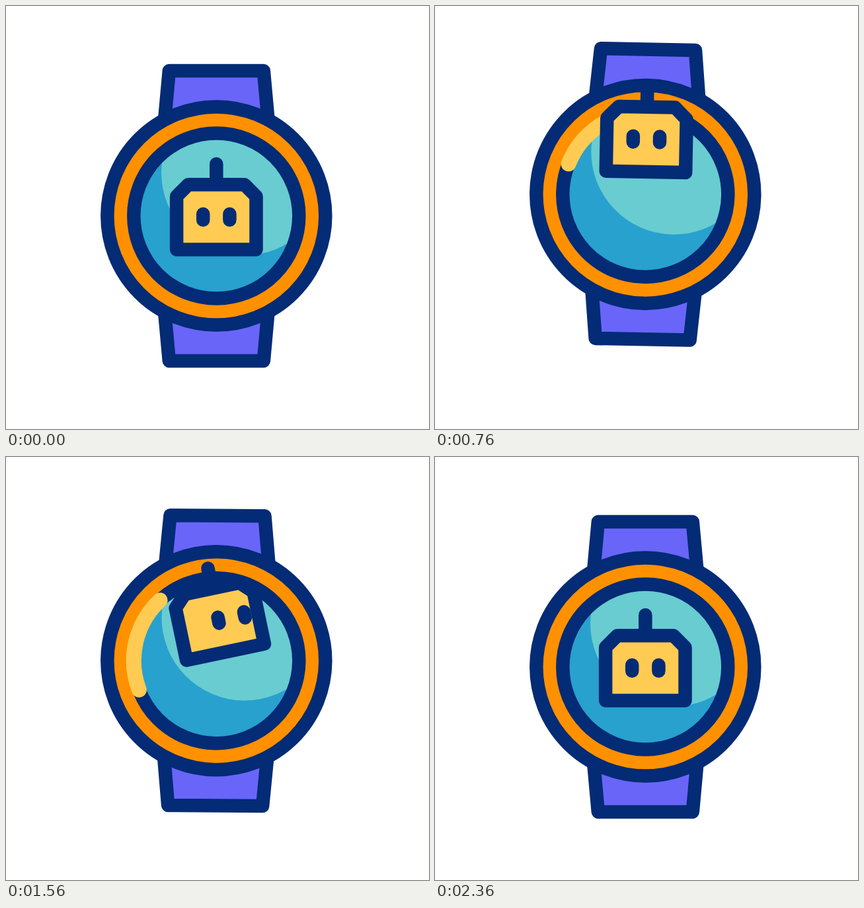
Recreate the animation shown at these times as an HTML page. Size 640 by 640 pixels, loop 2400 ms.

```html
<!DOCTYPE html>
<html lang="en">
<head>
<meta charset="utf-8">
<title>Smartwatch robot</title>
<style>
  html, body { margin: 0; width: 100%; height: 100%; overflow: hidden; background: #fff; }
  svg { display: block; width: 100%; height: 100%; }
  .line { stroke: #042b75; stroke-width: 20.5; stroke-linecap: round; stroke-linejoin: round; }
</style>
</head>
<body>
<svg viewBox="0 0 640 640">
  <defs>
    <clipPath id="glass"><circle r="116"/></clipPath>
  </defs>
  <g id="watch">
    <g class="line" fill="#6965f8">
      <path d="M-79-137L-71.5-219.4H71.5L79-137Z"/>
      <path d="M-79 137L-71.5 219.4H71.5L79 137Z"/>
    </g>
    <circle class="line" r="165" fill="#ff9100"/>
    <circle r="120" fill="#28a1ce"/>
    <g clip-path="url(#glass)"><circle cx="42.2" cy="-65.5" r="125.5" fill="#68ccd1"/></g>
    <circle class="line" r="125" fill="none"/>
    <path id="arc" fill="none" stroke="#ffcb52" stroke-width="23" stroke-linecap="round"/>
    <g id="robot" class="line">
      <path d="M0-78.5V-47"/>
      <path fill="#ffcb52" d="M-60.2 51V-29.5L-42.5-47.2H42.5L60.2-29.5V51Z"/>
      <path id="eyes" d="M-20.1-2.8v9M20.1-2.8v9"/>
    </g>
  </g>
</svg>
<script>
const LOOP = 2400, PIVOT = -13, FLOOR = 51;
const $ = id => document.getElementById(id);
const watch = $('watch'), robot = $('robot'), eyes = $('eyes'), arc = $('arc');

// Progress from 0 to 1 between two times, plain and eased
const part = (t, from, to) => Math.min(1, Math.max(0, (t - from) / (to - from)));
const ramp = (t, from, to) => {
  const u = part(t, from, to);
  return u * u * (3 - 2 * u);
};

// Swings from rest through evenly timed peaks and back to rest
function sway(t, start, beat, ...peaks) {
  return [...peaks, 0].reduce((v, peak, i) => {
    const from = start + i * beat;
    return v + (peak - (peaks[i - 1] || 0)) * ramp(t, from, from + beat);
  }, 0);
}

function point(deg) {
  const a = deg * Math.PI / 180;
  return (125 * Math.cos(a)).toFixed(2) + ' ' + (125 * Math.sin(a)).toFixed(2);
}

function drawArc(t) {
  const head = 102 + 492 * ramp(t, 131, 1673);
  const tail = Math.max(102, 72 + 804 * ramp(t, 48, 2864));
  arc.setAttribute('d', head > tail ? `M${point(tail)}A125 125 0 0 1 ${point(head)}` : '');
}

function drawWatch(t) {
  const y = 317.5 + sway(t, 0, 355, 62.5, -37.7, 53.2, -22.3, 15);
  const tilt = sway(t, 205, 370, -10.4, 12.4, -9.6, 4);
  watch.setAttribute('transform', `translate(318.3 ${y}) rotate(${tilt})`);
}

function drawRobot(t) {
  const float = ramp(t, 200, 575) - ramp(t, 1440, 1800);
  const hop = ramp(t, 1800, 2130) - ramp(t, 2130, 2280);
  const left = ramp(t, 855, 1210) - ramp(t, 1210, 1560);
  const right = ramp(t, 1210, 1560) - ramp(t, 1700, 2130);
  const squash = 0.09 * Math.sin(Math.PI * part(t, 2250, 2360));

  robot.setAttribute('transform',
    `translate(0 ${-85 * float - 40 * hop}) ` +
    `rotate(${15.2 * left - 12.3 * right} 0 ${PIVOT}) ` +
    `translate(0 ${FLOOR}) scale(${1 + squash} ${1 - squash}) translate(0 ${-FLOOR})`);
  eyes.setAttribute('transform', `translate(${19.7 * (right - left)} 0)`);
}

function frame() {
  const t = performance.now() % LOOP;
  drawWatch(t);
  drawArc(t);
  drawRobot(t);
  requestAnimationFrame(frame);
}
frame();
</script>
</body>
</html>
```
